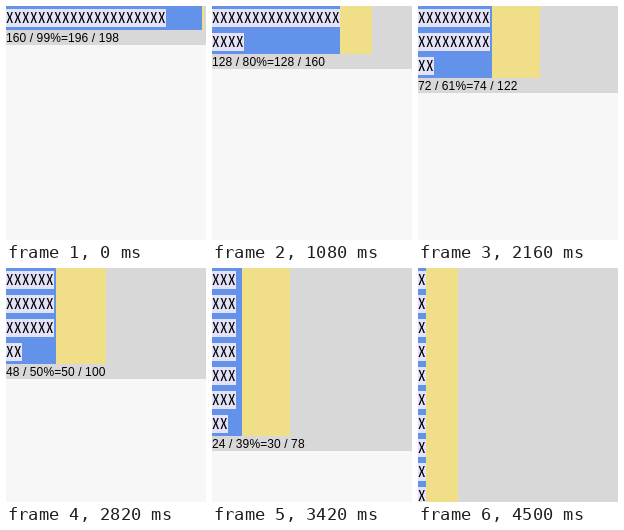
Recreate the animation shown at these times as an HTML page. Size 200 by 234 pixels, loop 4.56 s.

```html
<!DOCTYPE html>
<html lang="en">
<head>
<meta charset="utf-8">
<title>Wrapping width</title>
<style>
html, body { margin: 0; width: 100%; height: 100%; overflow: hidden; background: #f7f7f7; }
svg { display: block; width: 200px; height: 234px; }
.mono { font: 15px "Noto Sans Mono CJK JP", "Noto Sans Mono", monospace; }
#label { font: 12px "Liberation Sans", Arial, sans-serif; letter-spacing: .1px; white-space: pre; }
</style>
</head>
<body>
<svg viewBox="0 0 200 234" shape-rendering="crispEdges">
  <rect width="200" height="234" fill="#f7f7f7"/>
  <rect id="panel" width="200" fill="#d8d8d8"/>
  <rect id="outer" fill="#f0df88"/>
  <rect id="inner" fill="#6292ea"/>
  <g id="rows"></g>
  <text id="label" x="0"></text>
</svg>
<script>
const STEP = 60, STEPS = 76;
const COUNT = 20, CELL = 8, LINE = 24, TAIL = 4;
const $ = id => document.getElementById(id);
const set = (el, attrs) => { for (const k in attrs) el.setAttribute(k, attrs[k]); };

function add(name, attrs) {
  const el = document.createElementNS("http://www.w3.org/2000/svg", name);
  set(el, attrs);
  $("rows").appendChild(el);
  return el;
}

const xs = Array.from({ length: COUNT }, (_, i) => i * CELL).join(" ");
const rows = Array.from({ length: COUNT }, (_, i) => ({
  mark: add("rect", { y: i * LINE + 3, height: 18, fill: "#e3e2f8" }),
  text: add("text", { x: xs, y: i * LINE + 17, class: "mono" })
}));

// Letters per line; the last letter keeps a thin tail that must fit beside it.
function wrap(width) {
  const per = Math.min(COUNT, Math.floor(width / CELL));
  const lines = [];
  for (let left = COUNT; left > 0; left -= per) lines.push(Math.min(per, left));
  const last = lines[lines.length - 1];
  if (last > 1 && last * CELL + TAIL > width) {
    lines[lines.length - 1]--;
    lines.push(1);
  }
  return lines;
}

function draw(ms) {
  const step = Math.floor(ms / STEP) % STEPS;
  const pct = 99 - Math.floor(step * 19 / 18 + .35);
  const outer = pct * 2, inner = pct * pct / 50;
  const lines = wrap(inner);
  const height = lines.length * LINE;

  set($("panel"), { height: height + 15 });
  set($("outer"), { width: outer, height });
  set($("inner"), { width: Math.round(inner), height });
  rows.forEach(({ mark, text }, i) => {
    const n = lines[i] || 0;
    set(mark, { width: n * CELL });
    text.textContent = "X".repeat(n);
  });
  set($("label"), { y: height + 12 });
  $("label").textContent =
    `${Math.max(...lines) * CELL} / ${pct}%=${Math.round(inner)} / ${outer}`;
}

let start;
function tick(now) {
  if (start === undefined) start = now;
  draw(Math.max(0, now - start));
  requestAnimationFrame(tick);
}
draw(0);
requestAnimationFrame(tick);
</script>
</body>
</html>
```
